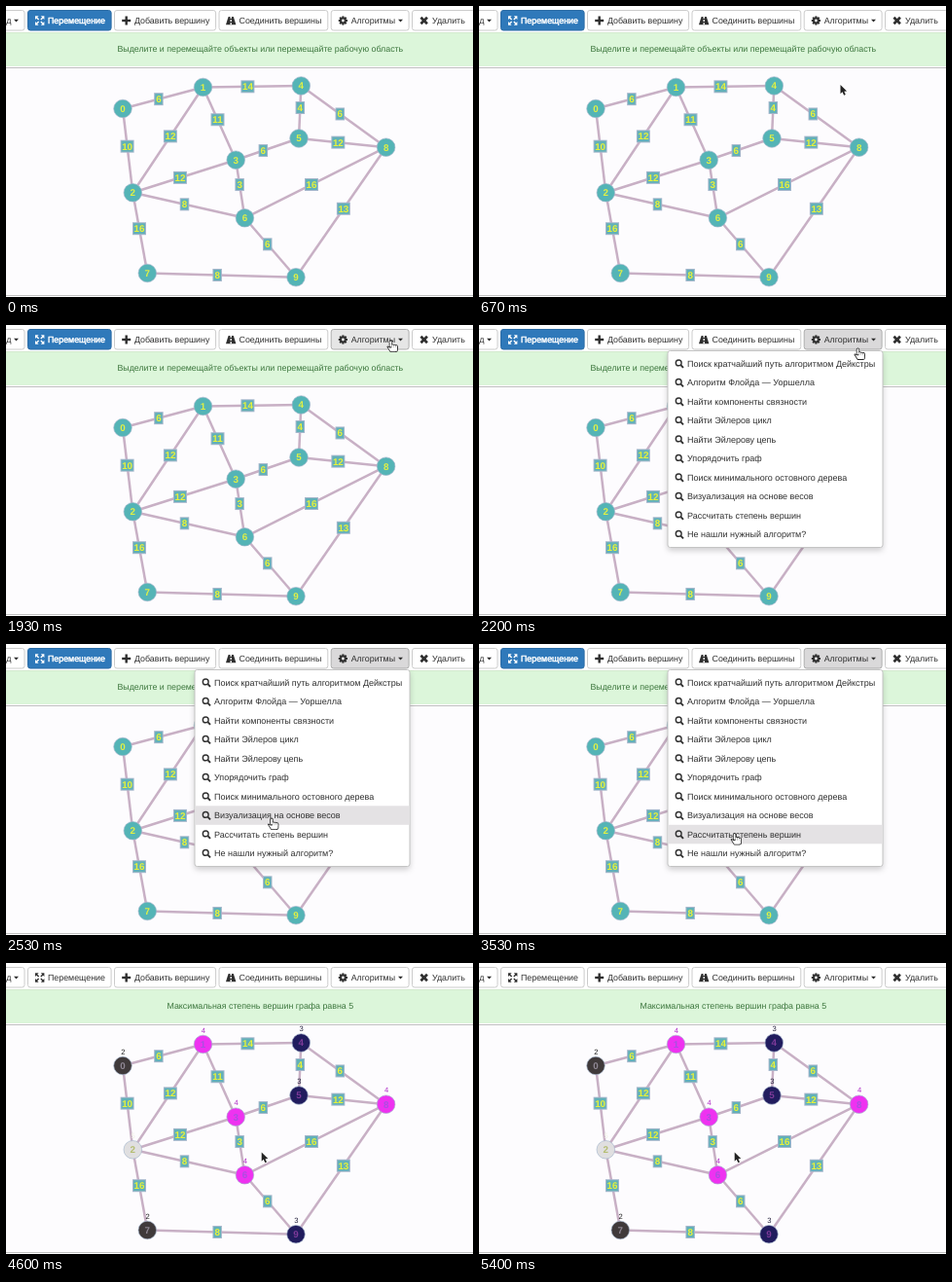
These frames come from a looping animation (480 by 299 pixels, 5.47 s). An HTML page with a canvas:

```html
<!DOCTYPE html>
<html lang="ru">
<head>
<meta charset="utf-8">
<title>Степень вершин графа</title>
<style>
html, body { margin: 0; width: 100%; height: 100%; overflow: hidden; background: #fff; }
canvas { display: block; width: 480px; height: 299px; }
</style>
</head>
<body>
<canvas id="stage"></canvas>
<script>
const W = 480, H = 299, LOOP = 5470, STEP = 200 / 3;
const OPEN = 2130, DONE = 3600;
const ROW = 19.5, MENU_TOP = 29.8;
const DARK = '#2f2f2f', LINE = '#ccc', FONT = '"Liberation Sans", Arial, sans-serif';

const canvas = document.getElementById('stage');
const ctx = canvas.getContext('2d');
const dpr = window.devicePixelRatio || 1;
canvas.width = W * dpr;
canvas.height = H * dpr;
ctx.scale(dpr, dpr);
ctx.textRendering = 'geometricPrecision';

const nodes = [
  [120, 105.5], [202.5, 83.5], [130.3, 191.8], [236.2, 158.2], [303.3, 82],
  [301, 136], [245.4, 217.8], [145.3, 274.5], [390.6, 145.2], [298, 278.7]
];
// from-to:weight
const edges = ('0-1:6 1-4:14 0-2:10 1-2:12 1-3:11 4-5:4 4-8:6 5-8:12 3-5:6 ' +
  '2-3:12 3-6:3 2-6:8 6-8:16 8-9:13 6-9:6 2-7:16 7-9:8')
  .split(' ').map(s => s.split(/[-:]/).map(Number));
const degree = nodes.map((_, i) => edges.filter(([a, b]) => a === i || b === i).length);
// by degree: fill, number, caption
const palette = {
  2: ['#403a3b', '#8f8794', '#222'],
  3: ['#211c5e', '#7d3a98', '#26243f'],
  4: ['#ee32f0', '#a94fe0', '#b02fc6'],
  5: ['#e0dfe0', '#b4bd70', '#eeeee2']
};
const buttons = [
  [22, 'move', 'Перемещение'], [111, 'plus', 'Добавить вершину'],
  [218.5, 'road', 'Соединить вершины'], [333.7, 'cog', 'Алгоритмы'],
  [417, 'cross', 'Удалить']
];
const items = [
  'Поиск кратчайший путь алгоритмом Дейкстры', 'Алгоритм Флойда — Уоршелла',
  'Найти компоненты связности', 'Найти Эйлеров цикл', 'Найти Эйлерову цепь',
  'Упорядочить граф', 'Поиск минимального остовного дерева',
  'Визуализация на основе весов', 'Рассчитать степень вершин',
  'Не нашли нужный алгоритм?'
];
// start, end, then the place the pointer moves to
const moves = [
  [400, 640, 371.5, 81], [1050, 1600, 395.5, 16],
  [2160, 2460, 273, 179], [2650, 3000, 262.7, 194.5]
];

function pointer(t) {
  if (t < moves[0][0]) return null;
  let x = 450, y = 96;
  for (const [from, to, toX, toY] of moves) {
    const p = Math.min(1, Math.max(0, (t - from) / (to - from)));
    const ease = p * p * (3 - 2 * p);
    x += (toX - x) * ease;
    y += (toY - y) * ease;
  }
  return [x, y];
}

function text(s, x, y, size, color, align = 'left', weight = '') {
  ctx.font = `${weight} ${size}px ${FONT}`;
  ctx.textAlign = align;
  ctx.fillStyle = color;
  ctx.fillText(s, x, y);
}

function rect(x, y, w, h, color) {
  ctx.fillStyle = color;
  ctx.fillRect(x, y, w, h);
}

function fill(color) {
  ctx.fillStyle = color;
  ctx.fill();
}

function stroke(color, width = 1) {
  ctx.strokeStyle = color;
  ctx.lineWidth = width;
  ctx.stroke();
}

function poly(...points) {
  ctx.beginPath();
  for (const p of points) ctx.lineTo(...p);
}

function circle(x, y, r) {
  ctx.beginPath();
  ctx.arc(x, y, r, 0, 2 * Math.PI);
}

function box(x, y, w, h, r = 2.5) {
  ctx.beginPath();
  ctx.roundRect(x, y, w, h, r);
}

function at(x, y, draw, ...args) {
  ctx.save();
  ctx.translate(x, y);
  draw(...args);
  ctx.restore();
}

function plus(size, thick, color) {
  for (let i = 0; i < 2; i++) {
    rect(-size, -thick / 2, 2 * size, thick, color);
    ctx.rotate(Math.PI / 2);
  }
}

const icons = {
  move(color) {
    for (let i = 0; i < 4; i++) {
      ctx.rotate(Math.PI / 2);
      poly([-4.7, -4.7], [-1.1, -4.7], [-4.7, -1.1]);
      fill(color);
      poly([-3.5, -3.5], [-1.1, -1.1]);
      stroke(color, 1.4);
    }
  },
  plus(color) {
    plus(4.5, 2.4, color);
  },
  road(color) {
    poly([-2.6, -4], [2.6, -4], [5.2, 4.2], [-5.2, 4.2]);
    fill(color);
    for (let y = -4; y < 4; y += 3.1) rect(-0.7, y, 1.4, 1.9, '#fff');
  },
  cog(color) {
    for (let i = 0; i < 4; i++) {
      rect(-1, -4.6, 2, 9.2, color);
      ctx.rotate(Math.PI / 4);
    }
    circle(0, 0, 2.4);
    fill('#f4f4f4');
    stroke(color, 2);
  },
  cross(color) {
    ctx.rotate(Math.PI / 4);
    plus(4.6, 2.6, color);
  },
  search(color) {
    circle(-0.8, -0.9, 2.9);
    stroke(color, 1.4);
    poly([1.4, 1.3], [4, 4]);
    stroke(color, 1.9);
  }
};

function button(x, w, back, border) {
  box(x + 0.5, 4.5, w - 1, 20.5);
  fill(back);
  stroke(border);
}

function caret(x) {
  poly([x, 13.8], [x + 5, 13.8], [x + 2.5, 16.6]);
  fill(DARK);
}

function toolbar(done, hover, open) {
  button(-30, 49.5, '#fff', LINE);
  text('д', 0.3, 18, 8.9, DARK);
  caret(8);
  buttons.forEach(([x, icon, label], i) => {
    const next = buttons[i + 1] || [W + 5];
    const primary = icon === 'move' && !done;
    const lit = icon === 'cog' && (hover || open);
    const ink = primary ? '#fff' : DARK;
    button(x, next[0] - x - 2.4,
      primary ? '#2f79ba' : !lit ? '#fff' : open ? '#dad9da' : '#e6e6e6',
      primary ? '#2b6ba5' : lit ? '#adadad' : LINE);
    at(x + 12.7, 15, icons[icon], ink);
    text(label, x + 21, 18, 8.85, ink);
    if (primary) {
      ctx.strokeStyle = ink;
      ctx.lineWidth = 0.45;
      ctx.strokeText(label, x + 21, 18);
    }
    if (icon === 'cog') caret(403);
  });
}

function graph(done) {
  for (const [a, b] of edges) {
    poly(nodes[a], nodes[b]);
    stroke('#c8b0c5', 2.5);
  }
  for (const [a, b, weight] of edges) {
    const [x0, y0] = nodes[a], [x1, y1] = nodes[b];
    const k = 0.5 - 4.5 / Math.hypot(x1 - x0, y1 - y0);
    const x = x0 + (x1 - x0) * k, y = y0 + (y1 - y0) * k;
    const w = weight > 9 ? 14 : 9.5;
    rect(x - w / 2, y - 6.5, w, 13, '#a5b6cc');
    rect(x - w / 2 + 1, y - 5.5, w - 2, 11, '#62b1b8');
    text(weight, x, y + 3.4, 9.8, '#e6f238', 'center', 'bold');
  }
  nodes.forEach(([x, y], i) => {
    const [back, ink, caption] = done ? palette[degree[i]] : ['#54b4b6', '#e0f044'];
    circle(x, y, 9.3);
    fill(back);
    stroke('rgba(165,182,204,.65)');
    text(i, x, y + 3.4, 9.8, ink, 'center', 'bold');
    if (done) text(degree[i], x + 0.4, y - 11.8, 7.6, caption, 'center');
  });
}

function menu(y) {
  ctx.save();
  ctx.shadowColor = 'rgba(0,0,0,.2)';
  ctx.shadowBlur = 6 * dpr;
  ctx.shadowOffsetY = 3 * dpr;
  box(194, 26.5, 221, 202);
  fill('#fff');
  ctx.restore();
  stroke('#c4c4c4');
  const active = Math.floor((y - MENU_TOP) / ROW);
  items.forEach((s, i) => {
    const top = MENU_TOP + i * ROW;
    if (i === active) rect(194.5, top, 220, ROW, '#e4e2e4');
    at(206, top + 10, icons.search, DARK);
    text(s, 214, top + 12.9, 9, DARK);
  });
}

function arrow() {
  ctx.scale(0.9, 0.9);
  poly([0, 0], [0, 10.2], [2.3, 8.1], [4, 12], [5.9, 11.2], [4.2, 7.4], [7.3, 7.2]);
  ctx.closePath();
  stroke('#fff', 1.6);
  fill('#222');
}

// outlines first, then fills, so the parts join into one shape
function hand() {
  for (const paint of [() => stroke('#222', 1.6), () => fill('#fff')]) {
    for (let i = 0; i < 4; i++) {
      box(-1 + 1.9 * i, i ? 3.8 + 0.4 * i : 0.4, 1.8, 6, 0.9);
      paint();
    }
    poly([-3.2, 6.4], [-1, 7.4], [6.4, 7], [5, 11.2], [-0.2, 11.2]);
    ctx.closePath();
    paint();
  }
}

function draw(t) {
  const done = t >= DONE - 1, open = t >= OPEN && !done;
  const tip = pointer(t);
  const hover = tip && tip[0] > 334 && tip[1] < 25;
  rect(0, 0, W, H, '#fff');
  rect(0, 64, W, 233, '#fdfcfe');
  rect(0, 27, W, 35, '#d2e9cd');
  rect(0, 28, W, 34, '#dcf6da');
  for (const y of [63, 297]) rect(0, y, W, 1, '#c0c0c0');
  toolbar(done, hover, open);
  const hint = done ? 'Максимальная степень вершин графа равна 5'
    : 'Выделите и перемещайте объекты или перемещайте рабочую область';
  text(hint, 261.3, 47, 8.85, '#3c763d', 'center');
  graph(done);
  if (open) menu(tip[1]);
  if (tip) at(...tip, hover || open ? hand : arrow);
}

function tick(now) {
  draw(Math.floor((now % LOOP + 4) / STEP) * STEP);
  requestAnimationFrame(tick);
}
ctx.lineJoin = 'round';
draw(0);
requestAnimationFrame(tick);
</script>
</body>
</html>
```
